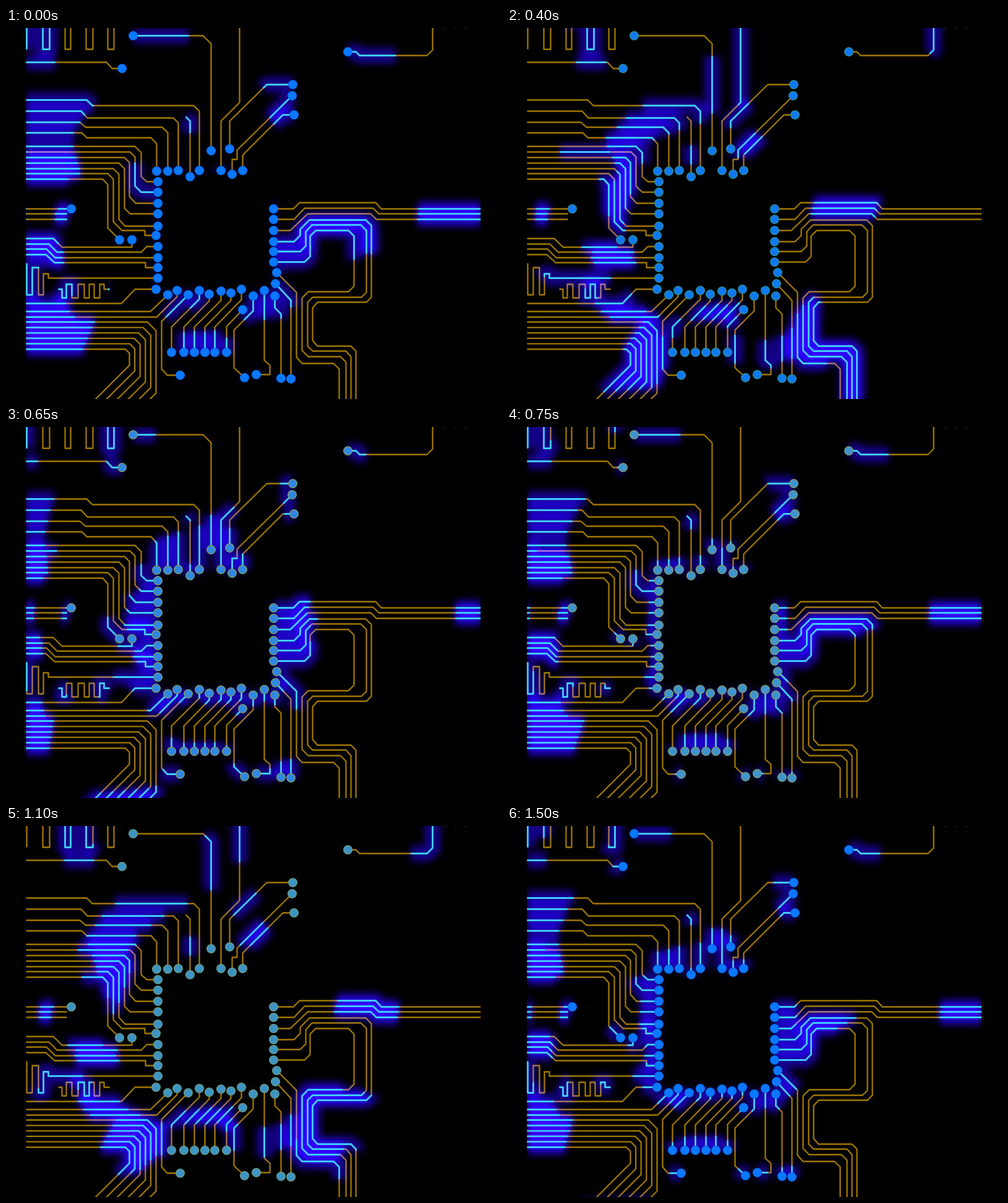
An HTML page that plays this animation: 800x600 px, repeating every 1550 ms.

```html
<!DOCTYPE html>
<html lang="en">
<head>
<meta charset="utf-8">
<title>Circuit pulses</title>
<style>
  html, body { margin: 0; width: 100%; height: 100%; overflow: hidden; background: #000; }
  svg { display: block; width: 800px; height: 600px; }
  path { fill: none; stroke-linejoin: round; }
  #base { stroke: #a07800; stroke-width: 2.3; mix-blend-mode: screen; }
  #glow, #lit {
    stroke-dasharray: 305px 695px;
    animation: flow 1550ms steps(31) -1ms infinite;
  }
  #glow { stroke: #2800ff; stroke-width: 26; stroke-opacity: .52; filter: blur(6px); }
  #glow path { mix-blend-mode: plus-lighter; }
  #lit { stroke: #40c8ff; stroke-width: 2.8; }
  #pins { stroke-width: 1.5; animation: tint 1550ms linear -1ms infinite; }
  @keyframes flow {
    from { stroke-dashoffset: 10px; }
    to { stroke-dashoffset: -1955px; }
  }
  @keyframes tint {
    0%, 97%, 100% { fill: #0a78ff; stroke: #0a72f4; }
    26% { fill: #0e79f2; stroke: #2f8a98; }
    42% { fill: #2f88e4; stroke: #7a9868; }
    58% { fill: #55a5ae; stroke: #7a9d80; }
    71% { fill: #3c94c4; stroke: #6a9a88; }
    84% { fill: #107be6; stroke: #3088a0; }
  }
</style>
</head>
<body>
<svg viewBox="0 0 800 600">
  <clipPath id="frame"><path d="M32 0H767V600H32Z"/></clipPath>
  <g clip-path="url(#frame)">
    <g transform="translate(.5 .5)">
      <g id="glow"></g>
      <g id="base"></g>
      <g id="lit"></g>
      <g id="pins"></g>
    </g>
    <path d="M707 0h4M725 0h4M741 0h4" stroke="#3a2c10" stroke-width="2"/>
  </g>
</svg>
<script>
// Each trace runs the way its pulse travels; "o" marks an end that has a pin.
const traces = `
M33 34V-40H59V34H70V-40H95V34H104V-40H129V34H140V-40H164V34H174V-40
M32 55H162L171 65H187 o
o M205 12H318L331 25V198 o
M377 -350V120L347 150V230 o
o M552 38H565L571 44H680L689 35V-93
M32 116H130L139 125H303L312 134V230 o
M32 134H121L131 145H270L278 153V230 o
M32 152H119L128 160H252L261 169V231 o
M32 169H122L130 177H234L243 187V231 o
M290 143L297 150V240 o
M32 191H208L218 201V240L227 248H245 o
o M245 265H218L208 255V208L200 200H32
M32 209H191L199 217V272L209 283H245 o
M32 218H182L191 227V291L200 300H245 o
M32 227H173L182 236V309L192 320H245 o
M32 235H164L173 244V313L187 327H224V335H242 o
M32 244H156L164 253V323L183 342 o
o M105 292H32
M98 300H32
M98 309H32
M32 340H76L90 354H203V342 o
M32 349H69L82 362H218L227 353H245 o
M32 357H65L79 371H245 o
M32 366H64L78 379H225V387H245 o
M33 380V431H42V387H52V431H60V397H68V404H245 o
M84 422H90V436H97V414H106V436H116V414H126V436H134V414H142V436H151V414H158V422H167
M32 445H186L208 422H242 o
M32 458H233L261 431 o
M32 467H243L276 434V424 o
o M294 431L251 474V551L260 561H281 o
o M312 424V438L267 483V524 o
o M287 524V483L328 441V430 o
o M304 524V483L347 440V425 o
o M321 524V483L363 440V428 o
o M337 524V483L380 439V422 o
o M356 524V482L382 455 o
o M399 433V457L368 488V549L385 565 o
o M417 424V537L426 545V560H404 o
o M434 433V452L444 462V566 o
o M435 413L460 440V567 o
M538 725V551L529 542H478L469 532V427L437 395 o
o M463 91H421L361 150V195 o
o M462 109L373 197V212H365V236 o
o M465 140H447L382 205V230 o
M767 292H606L597 282H474L464 292H432 o
M767 300H602L593 291H482L465 309H432 o
M767 309H598L589 300H487L459 327H432 o
o M432 345H465L475 335V325L490 310H581L590 319V435L582 443H503L495 452V505L503 514H557L565 522V765
o M432 361H475L484 352V329L494 318H573L582 327V427L574 435H495L487 443V514L495 522H549L557 531V750
o M432 378H482L491 369V336L500 327H553L562 336V417L553 426H488L478 436V521L488 531H540L549 540V750
`.trim().split('\n');

// Nested bus at the lower left
for (let i = 0; i < 6; i++) {
  const y = 475 + 8.8 * i, x = 242 - 8.6 * i, c = 14 - 1.5 * i, end = 590 - 9 * i;
  traces.push(`M32 ${y}H${x - c}L${x} ${y + c}V${end}L${x - 632 + end} 632`);
}

const add = (layer, tag, attrs) => {
  const el = document.createElementNS('http://www.w3.org/2000/svg', tag);
  for (const k in attrs) el.setAttribute(k, attrs[k]);
  return document.getElementById(layer).appendChild(el);
};
const addPin = ({ x, y }) => add('pins', 'circle', { cx: x, cy: y, r: 6.8 });

for (const line of traces) {
  const d = line.replace(/o/g, '').trim();
  const path = add('base', 'path', { d });
  for (const layer of ['glow', 'lit']) add(layer, 'path', { d, pathLength: 1000 });
  if (line.startsWith('o')) addPin(path.getPointAtLength(0));
  if (line.endsWith('o')) addPin(path.getPointAtLength(path.getTotalLength()));
}
</script>
</body>
</html>
```
